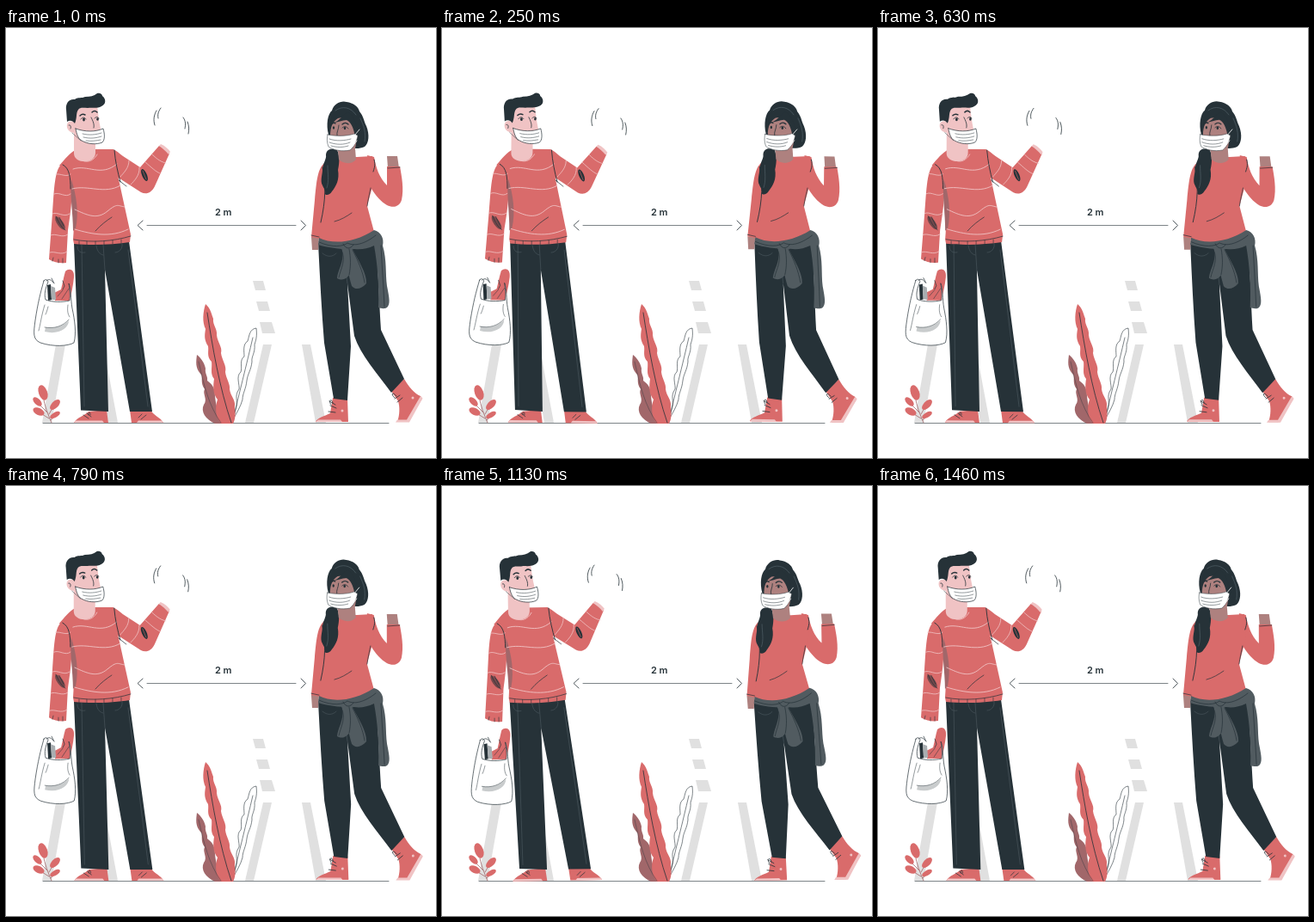
Animation of 500 by 500 pixels, one loop 1.5 s. Source, as an HTML page with a canvas:

```html
<!DOCTYPE html>
<html lang="en">
<head>
<meta charset="utf-8">
<title>Two metres apart</title>
<style>
html, body { margin: 0; width: 100%; height: 100%; overflow: hidden; background: #fff; }
canvas { display: block; width: 500px; height: 500px; }
</style>
</head>
<body>
<canvas id="stage"></canvas>
<script>
const RED = '#d96b6b', DARK = '#263238', SHADE = '#a1676a', GREY = '#515b60',
      ROAD = '#e0e0e0', PINK = '#f0c3c4', BROWN = '#ae817f', WHITE = '#fff';
const LOOP = 1500;

const canvas = document.getElementById('stage');
const ctx = canvas.getContext('2d');
const ratio = window.devicePixelRatio || 1;
canvas.width = canvas.height = 500 * ratio;

const fill = (color, d) => ({ color, path: new Path2D(d) });
const line = (color, width, d) => ({ color, width, path: new Path2D(d) });
const outlined = d => [fill(WHITE, d), line(DARK, 0.7, d)];

function oval(color, x, y, rx, ry, degrees) {
  const path = new Path2D();
  path.ellipse(x, y, rx, ry, degrees * Math.PI / 180, 0, 2 * Math.PI);
  return { color, path };
}

const scenery = [
  // road
  fill(ROAD, 'M58 368H69L53 459H42Z M103 368H113L130 459H119Z M299 368H309L288 459H278Z M344 368H354L372 459H360Z'),
  fill(ROAD, 'M287 294H299L302 305H290Z M291 318H304L307 329H294Z M295 342H309L313 355H298Z'),
  line(DARK, 0.6, 'M43 459.5H445'),

  // tall leaves
  fill(SHADE, 'M222 380C227 384 231 390 232 396C231 402 235 405 234 410C241 415 243 420 243 428C244 440 248 452 256 460H243C232 455 226 446 230 438C235 432 228 425 231 420C225 412 230 405 226 402C220 395 221 388 222 380Z'),
  fill(WHITE, 'M291 349C292 358 291 362 289 368C290 378 285 382 286 388C285 398 281 402 280 410C279 420 275 425 275 432C273 440 268 448 264 455L268 440C270 434 265 428 271 420C272 415 267 405 273 400C275 395 271 386 277 382C277 376 275 368 281 364C283 358 283 350 291 349Z'),
  line(DARK, 0.6, 'M264 455C268 448 273 440 275 432C275 425 279 420 280 410C281 402 285 398 286 388C285 382 290 378 289 368C291 362 292 358 291 349C283 350 283 358 281 364C275 368 277 376 277 382C271 386 275 395 273 400C267 405 272 415 271 420C265 428 270 434 268 440L264 455C270 430 280 390 287 360'),
  fill(RED, 'M232 321C238 326 239 333 241 338C240 345 246 350 245 357C246 366 252 371 250 378C251 386 257 393 255 400C256 408 261 414 260 420C261 428 267 432 266 440C266 447 268 452 264 460H250C243 452 243 440 246 432C240 425 241 415 242 408C237 402 240 395 239 388C233 382 236 376 235 370C230 362 231 357 232 350C228 342 229 330 232 321Z'),
  line(DARK, 0.8, 'M234 331C240 370 248 418 262 459'),
  line(DARK, 0.4, 'M224 388C230 415 236 440 250 459'),

  // small plant
  line(SHADE, 0.8, 'M43 428C45 440 49 450 53 459 M35 434L48 447 M57 437L50 449 M37 446L50 454 M58 450L52 456'),
  oval(RED, 43, 424, 5, 9, -20),
  oval(RED, 36.5, 434.5, 3.5, 6.5, -45),
  oval(RED, 57, 438, 3.8, 7.5, 45),
  oval(RED, 38, 446, 4, 7, -65),
  oval(RED, 57, 450, 3, 6.5, 60),

  // distance arrow
  line(DARK, 0.6, 'M164 229.5H337'),
  line(DARK, 0.8, 'M159 224L153 229.5L159 235 M343 224L348.5 229.5L343 235')
];

const man = [
  // shoes
  fill(RED, 'M79 459C82 453 91 451 96 446L117 444L119 459Z M144 444H168C172 451 180 453 183 459H146Z'),
  fill(PINK, 'M79 459L81 456.5H112L114 459Z M152 459L154 456.5H181L183 459Z'),
  line(DARK, 0.7, 'M94 448L99 452 M90 450L96 454 M98 450C99 446 95 446 96 450 M158 449L154 453 M163 450L157 455'),

  // trousers
  fill(DARK, 'M79 250L143 248L170 446L144 446L115 281L119 446L87 444.5Z'),
  line('#4d5a61', 0.6, 'M88 252L91 440 M113 252L115 281 M83 254C83 260 87 262 92 261 M135 251C136 257 131 261 127 261 M105 253C106 260 109 263 113 264 M142 258L165 440'),

  // shopping
  fill(RED, 'M69 283C73 279 80 280 79 290C78 300 76 308 74 317H57L56 308L64 304C66 296 67 290 69 283Z'),
  fill(DARK, 'M48 299L52 298L53 316L49 317Z'),
  fill('#a9aeb1', 'M52 300L57 302L58 316L53 316Z'),
  line(DARK, 0.5, 'M60 312L66 305 M65 315L73 303'),
  ...outlined('M44 294C40 308 37 320 34 340C32 355 31 362 40 366C55 371 72 370 79 366C82 355 80 340 77 326C75 315 76 304 73 297C74 304 75 310 74 317C65 319 54 319 46 316C44 309 46 303 49 295C48 292 45 292 44 294Z'),
  fill('#c9cccd', 'M46 348C56 350 66 347 73 340C73 350 60 357 45 353Z'),
  line(DARK, 0.5, 'M45 322C41 335 40 345 38 352 M49 324C48 328 47 331 46 333 M72 322C71 329 72 333 74 336 M45 348C56 350 66 347 73 339'),
  line(DARK, 0.7, 'M47 294C50 291 53 293 55 296 M53 291L56 297 M66 294L68 300L66 304'),

  // sweater
  fill(RED, 'M66 158C56 162 56 190 54 215L50 269C57 273 63 274 70 273L72 235C76 210 78 190 76 166Z'),
  fill(RED, 'M124 141C128 142 132 146 136 149L156 162L178 137C183 139 187 142 190 146L173 184C169 192 163 194 157 191L129 173Z'),
  fill(PINK, 'M178 137L180 135C185 137 189 141 191 144L189 147C186 143 182 140 178 137Z'),
  fill(RED, 'M62 160C68 153 74 145 82 141L125 141C128 152 129 164 131 176L145 240L144 249C125 252 100 253 79 251L78 246C80 225 78 205 75 180L74 166Z'),
  fill(SHADE, 'M76 176C82 195 85 215 81 233L78 236C78 215 74 195 76 176Z'),
  line(PINK, 0.9, 'M78 164C95 158 110 174 129 158 M77 187C95 182 115 194 133 183 M80 211C95 218 106 223 118 213S130 207 138 208 M80 234C100 240 122 244 142 234 M82 147C88 158 100 158 106 147'),
  line(PINK, 0.8, 'M58 170C64 169 70 174 75 170 M56 193C62 190 69 198 75 193 M54 216C60 213 67 221 74 216 M52 241C58 238 65 245 72 240 M51 261C57 259 64 265 71 260'),
  line(PINK, 0.8, 'M143 154C143 163 137 168 133 173 M155 162C156 171 149 178 145 182 M162 156C169 162 174 167 179 169 M170 147C176 153 181 156 186 157'),
  line(DARK, 0.9, 'M66 159C74 163 75 174 75 187 M126 142C127 155 130 168 133 179'),
  line(DARK, 0.7, 'M104 236C110 229 117 224 123 220 M79 246C100 250 125 248 145 242 M131 177L140 184'),
  line(DARK, 0.6, 'M85 248V252 M94 248V252 M104 248V252 M114 248V252 M124 247V251 M134 246V250 M55 267L54 271 M61 269V273 M66 268V273'),
  oval('#74484b', 63, 227, 3.4, 9, -35),
  line(DARK, 0.7, 'M58 219C62 228 65 232 69 235 M62 220L67 230'),
  oval(DARK, 161, 171, 2.8, 7.5, -24),
  line(RED, 0.6, 'M159 166L163 176'),

  // head
  fill(PINK, 'M80 94L106 90C107 99 108 108 110 117C113 128 112 134 104 134V145C104 159 79 158 79 146V122C73 121 70 117 71 112C72 109 75 108 78 109Z'),
  fill(DARK, 'M71 109L70 95C69 88 73 82 80 83C84 80 88 82 92 80C98 80 102 79 106 76C109 75 112 77 112 79C117 83 116 89 111 91C106 94 100 92 95 93C90 93 86 92 84 95C81 99 83 104 80 111C77 107 74 107 71 109Z'),
  oval(DARK, 90.5, 106.5, 1.4, 1.9, 0),
  oval(DARK, 106.5, 106, 1.3, 1.8, 0),
  line(DARK, 1.5, 'M86 102C88 100 90 100 92 101 M100 98C102 96 104 96 106 98'),
  line(DARK, 0.8, 'M87 106C89 103 92 104 93 106 M103 105C105 103 107 103 108 105 M99 104C101 108 103 112 102 116 M73 113C75 112 76 115 75 117'),
  ...outlined('M81 117C92 121 104 121 113 117C115 124 115 130 112 133C105 136 95 135 88 131C84 129 82 123 81 117Z'),
  line(DARK, 0.5, 'M89 123C97 125 105 124 111 122 M90 127C98 129 105 128 111 126 M93 131C99 132 105 131 110 130 M77 122L87 131'),

  // waving marks
  line(DARK, 0.8, 'M175 96C172 101 171 107 173 113 M180 93C177 97 176 101 177 105 M206 104C209 108 209 112 208 117 M211 109C213 114 213 118 212 123')
];

const woman = [
  // shoes
  fill(RED, 'M380 430H397L398 458H360C362 453 371 451 377 448Z M448 422L463 408C468 417 475 425 482 428L484 431L467 458L455 458C458 450 458 440 456 434Z'),
  fill(PINK, 'M360 458L363 455.5H389L391 458Z M482 428L484.5 430.5L469 458.5H453L455 455.5H466Z'),
  line(DARK, 0.8, 'M376 434L383 438 M377 439L384 442 M375 446L383 447 M378 438C374 433 379 430 380 436 M452 431L458 427 M455 435L461 430 M452 430C447 426 449 422 454 428'),
  oval(PINK, 391, 445, 1.5, 1.5, 0),
  oval(PINK, 473, 430, 1.5, 1.5, 0),

  // trousers
  fill(DARK, 'M363 250L431 252C433 290 434 320 436 351L463 408L448 424C432 402 412 380 405 358L397 297L401 370L397 433L381 431L370 366C367 328 365 290 363 250Z'),
  line('#4d5a61', 0.6, 'M397 297L394 275 M368 262C374 267 380 266 384 262'),

  // sweater
  fill(BROWN, 'M355 243H364L363 258H356Z M443 149H455L457 163H444Z'),
  fill(RED, 'M372 156C362 161 361 180 359 200L355 243L365 245C369 225 376 205 374 185Z'),
  fill(RED, 'M420 148L428 150C430 162 434 174 443 183L443 161H458C460 172 463 187 460 200C457 209 449 209 443 206C436 202 430 195 425 187Z'),
  fill(RED, 'M370 158C375 154 382 153 387 150H408L426 149C430 160 429 176 425 188L420 207L428 237L427 247C405 253 380 251 364 248L366 215C370 205 369 180 370 158Z'),
  line(DARK, 0.9, 'M368 162C372 180 372 200 366 226 M428 153C430 160 428 163 427 167'),
  line(DARK, 0.7, 'M382 225C390 223 396 219 402 215 M424 186C423 192 421 199 420 207 M355 241L364 243 M444 163L458 162'),

  // tied jumper
  fill(GREY, 'M364 244C380 252 405 250 428 235C436 237 440 245 438 253C443 270 441 285 443 300C446 315 447 321 443 325C440 327 436 326 433 325C434 300 432 275 428 253C420 257 412 258 405 257C395 258 375 256 363 252Z'),
  fill(GREY, 'M389 254C396 268 386 280 385 291C392 295 398 291 402 282L402 256Z M396 255C394 270 399 290 402 300C406 305 413 304 419 297C420 285 408 268 402 255Z'),
  line(DARK, 0.7, 'M364 249C380 256 392 254 397 250C407 255 420 249 430 241 M392 251C395 257 400 258 404 252 M399 257C401 268 401 277 399 287 M403 258C409 270 415 283 417 296 M436 253C437 275 439 300 440 324 M390 258C396 270 389 280 387 290'),

  // head
  fill(DARK, 'M375 124C372 112 374 100 379 96C381 88 390 84 396 86C404 87 410 92 411 97C416 103 416 108 419 114C423 124 422 134 417 138C410 141 405 140 400 139L385 142C388 148 388 156 386 165C388 176 384 184 379 190C377 194 372 195 371 193C372 188 369 186 368 183C365 178 368 170 368 165C368 158 373 152 372 148C372 142 377 140 380 141Z'),
  fill(BROWN, 'M377 126C377 114 380 109 386 105C393 103 402 106 404 111L409 124L406 140L407 153C402 159 392 158 387 153L386 143L377 138Z'),
  fill(DARK, 'M380 110C388 109 391 101 397 98C404 100 407 110 411 124L406 126C404 116 401 109 396 107C391 107 386 110 380 110Z'),
  oval(DARK, 381, 116, 1.2, 1.7, 0),
  oval(DARK, 394, 116.5, 1.3, 1.8, 0),
  line(DARK, 1.3, 'M378 112C380 110 382 110 383 111 M391 112C393 110 396 110 398 112'),
  line(DARK, 0.8, 'M391 116C393 114 396 114 398 117 M387 113C387 118 384 121 385 125'),
  line('#607078', 0.5, 'M383 96C391 90 401 92 407 101 M412 105C416 114 419 122 417 132 M374 160C374 170 376 177 373 186'),
  fill(WHITE, 'M374 124C383 126 397 126 405 123L409 125C408 132 404 139 400 142C391 144 380 142 375 138C373 133 373 128 374 124Z'),
  line(DARK, 0.5, 'M374 124C383 126 397 126 405 123L409 125C408 132 404 139 400 142C391 144 380 142 375 138C373 133 373 128 374 124Z M376 129C384 132 394 131 401 129 M376 133C384 136 393 136 400 133 M378 137C385 139 392 139 398 137'),
  line(WHITE, 0.8, 'M406 124L411 118 M403 138L408 131')
];

function paint(parts) {
  for (const { color, width, path } of parts) {
    if (width) {
      ctx.strokeStyle = color;
      ctx.lineWidth = width;
      ctx.stroke(path);
    } else {
      ctx.fillStyle = color;
      ctx.fill(path);
    }
  }
}

function paintTilted(parts, x, y, angle) {
  ctx.save();
  ctx.translate(x, y);
  ctx.rotate(angle);
  ctx.translate(-x, -y);
  paint(parts);
  ctx.restore();
}

// Linear swing: 0, +1 at a quarter, -1 at three quarters, back to 0.
function swing(phase) {
  if (phase < 0.25) return phase * 4;
  return phase < 0.75 ? 2 - phase * 4 : phase * 4 - 4;
}

function draw(time) {
  const angle = swing(time % LOOP / LOOP) * Math.PI / 180;
  ctx.setTransform(ratio, 0, 0, ratio, 0, 0);
  ctx.fillStyle = WHITE;
  ctx.fillRect(0, 0, 500, 500);
  ctx.lineCap = ctx.lineJoin = 'round';
  paint(scenery);
  ctx.fillStyle = DARK;
  ctx.font = '600 11px Inter, sans-serif';
  ctx.textAlign = 'center';
  ctx.fillText('2 m', 252.7, 218.3);
  paintTilted(man, 123, 267, angle);
  paintTilted(woman, 420, 272, angle);
}

const start = performance.now();
function tick() {
  draw(performance.now() - start);
  requestAnimationFrame(tick);
}
tick();
</script>
</body>
</html>
```
